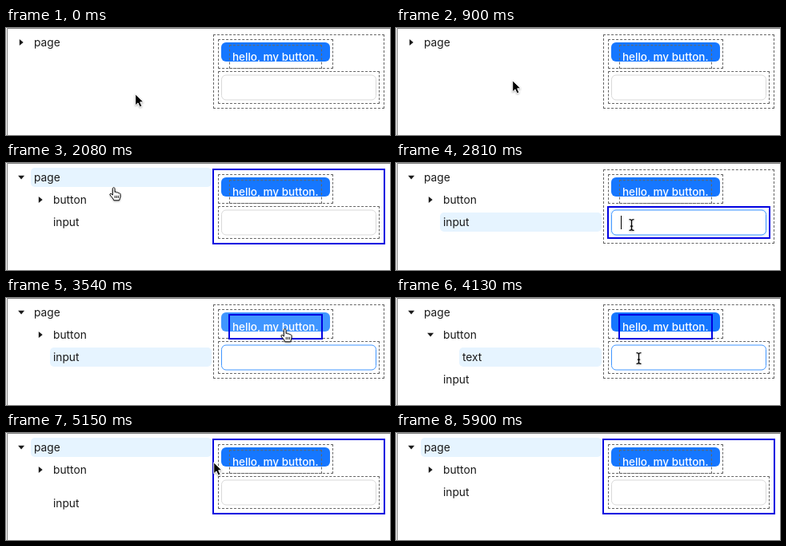
These frames come from a looping animation (480 px wide and 134 px high, 6.46 s). An HTML page:

```html
<!DOCTYPE html>
<html lang="en">
<head>
<meta charset="utf-8">
<title>Component tree</title>
<style>
html, body { margin: 0; width: 100%; height: 100%; overflow: hidden; background: #fff; }
svg { display: block; width: 480px; height: 134px; }
text { font: 13.75px Inter, "Liberation Sans", sans-serif; fill: #1a1a1a; }
.label { font-size: 13.5px; font-weight: 500; fill: #fff; }
.dash { position: absolute; box-sizing: border-box; border: 1px dashed #666; }
.pick { fill: none; stroke: #0000e0; stroke-width: 2; }
.row { fill: #e6f4ff; }
.caret { fill: #1a1a1a; }
.pointer { fill: #fff; stroke: #000; stroke-linejoin: round; }
#cursor { filter: drop-shadow(0 1px 1px rgba(0, 0, 0, .3)); }
</style>
</head>
<body>
<svg viewBox="0 0 480 134">
  <path d="M1.5 134V.5H480" fill="none" stroke="#808080"/>

  <rect id="row" class="row" height="24" rx="5"/>
  <path id="pageCaret" class="caret" d="M-4-2.3H4L0 2.6Z"/>
  <text x="35" y="23">page</text>
  <g id="kids">
    <path id="buttonCaret" class="caret" d="M-4-2.3H4L0 2.6Z"/>
    <text x="59" y="51">button</text>
    <text id="leaf" x="83" y="79">text</text>
    <text id="inputLabel" x="59">input</text>
  </g>

  <rect id="button" x="269" y="18" width="136" height="24" rx="6"/>
  <text class="label" x="283" y="41">hello, my button.</text>
  <rect id="glow" x="268" y="58" width="196" height="33" rx="7" fill="none" stroke="#e6f4ff" stroke-width="2"/>
  <rect id="input" x="269.5" y="59" width="193" height="31" rx="5.5" fill="#fff"/>
  <path id="beam" d="M281.5 66V83" stroke="#000"/>

  <foreignObject width="480" height="134">
    <div class="dash" id="pageDash" style="left:259px;top:8px;width:214px;height:93px"></div>
    <div class="dash" style="left:265px;top:14px;width:144px;height:37px"></div>
    <div class="dash" id="inputDash" style="left:265px;top:54px;width:202px;height:41px"></div>
    <div class="dash" id="textDash" style="left:279px;top:21px;width:116px;height:30px"></div>
  </foreignObject>
  <rect class="pick" id="pagePick" x="259" y="8" width="214" height="93"/>
  <rect class="pick" id="inputPick" x="265" y="55" width="202" height="39"/>
  <rect class="pick" id="textPick" x="279" y="21" width="116" height="30"/>

  <g id="cursor">
    <path id="arrow" d="M.7.8V14.9L4 11.9 6.2 17 8.9 15.8 6.7 10.8H11Z" fill="#000" stroke="#fff"/>
    <g id="hand">
      <path class="pointer" d="M4.3 10.2V2.4C4.3.2 7 .2 7 2.4V6.6C7.5 5.7 9.2 5.9 9.4 7.2 10.2 6.4 11.6 6.8 11.8 8 12.8 7.4 14 8 14 9.4V12.2C14 14 12.8 14.8 12.6 16.8H5.8C5.4 14.6 2.5 12.2 1 9.9.4 8.6 2 7.8 3 8.8Z"/>
      <path d="M7.2 10.8V14M9.3 10.8V14M11.4 10.8V14" stroke="#000" stroke-width=".9"/>
    </g>
    <path id="text" d="M.5.7C2.2.7 3.5 1.2 3.5 2.6V12.4C3.5 13.8 2.2 14.3.5 14.3M6.5.7C4.8.7 3.5 1.2 3.5 2.6M6.5 14.3C4.8 14.3 3.5 13.8 3.5 12.4M1.8 9.2H5.2" fill="none" stroke="#000" stroke-width="1.2"/>
  </g>
</svg>
<script>
const LOOP = 6460, START = 600, TICK = 146.66;
const $ = id => document.getElementById(id);
const set = (id, attrs) => { for (const k in attrs) $(id).setAttribute(k, attrs[k]); };
const show = (id, on) => { $(id).style.display = on ? '' : 'none'; };
const within = (n, a, b) => n >= a && n < b;

// Pointer stops: tick, shape, x, y
const path = [
  [-1, 'arrow', 161, 82], [0, 'arrow', 196, 78], [2, 'arrow', 145, 65],
  [5, 'arrow', 48, 22], [6, 'hand', 46, 20], [8, 'hand', 46, 20],
  [9, 'hand', 70, 22], [10, 'hand', 129, 30], [13, 'text', 291, 70],
  [15, 'text', 291, 70], [17, 'arrow', 312, 56], [20, 'hand', 343, 38],
  [22, 'hand', 343, 38], [24, 'text', 300, 68], [26, 'arrow', 270, 54],
  [27, 'arrow', 264, 39], [30, 'arrow', 259, 36], [34, 'arrow', 259, 36],
  [35, 'arrow', 359, 69], [36, '', 359, 69]
];
const rows = { page: [31, 6], input: [55, 62], text: [79, 62] };

function pointer(n) {
  let i = path.length - 1;
  while (i && path[i][0] > n) i--;
  const a = path[i], b = path[i + 1] || a;
  const k = b === a ? 0 : (n - a[0]) / (b[0] - a[0]);
  const mix = j => Math.round(a[j] + (b[j] - a[j]) * k);
  for (const s of ['arrow', 'hand', 'text']) show(s, s === a[1]);
  set('cursor', { transform: `translate(${mix(2)} ${mix(3)})` });
}

function tree(n, sel) {
  const open = n >= 8;
  const grow = within(n, 22, 31) ? 1 : n === 21 || n === 31 ? .5 : 0;
  show('kids', open);
  show('inputLabel', n >= 9);
  show('leaf', grow === 1);
  set('pageCaret', { transform: `translate(19.1 18) rotate(${open ? 0 : -90})` });
  set('buttonCaret', { transform: `translate(43.1 46) rotate(${within(n, 21, 31) ? 0 : -90})` });
  set('inputLabel', { y: 79 + 28 * grow });
  show('row', sel);
  if (sel) {
    const [x, y] = rows[sel];
    set('row', { x, y, width: 257 - x });
  }
}

function draw(t) {
  const n = t < START ? -1 : Math.min(36, Math.floor((t - START) / TICK));
  const sel = n < 8 ? '' : n < 15 ? 'page' : n < 20 ? 'input' : n < 31 ? 'text' : 'page';
  tree(n, n === 20 ? 'input' : sel);
  for (const id in rows) {
    show(id + 'Pick', id === sel);
    show(id + 'Dash', id !== sel);
  }
  set('button', { fill: within(n, 19, 23) ? '#4096ff' : '#1677ff' });
  set('input', { stroke: within(n, 13, 25) ? '#4096ff' : '#d9d9d9' });
  show('glow', within(n, 15, 20));
  show('beam', within(n, 15, 19));
  pointer(n);
}

function frame() {
  draw(performance.now() % LOOP);
  requestAnimationFrame(frame);
}
frame();
</script>
</body>
</html>
```
